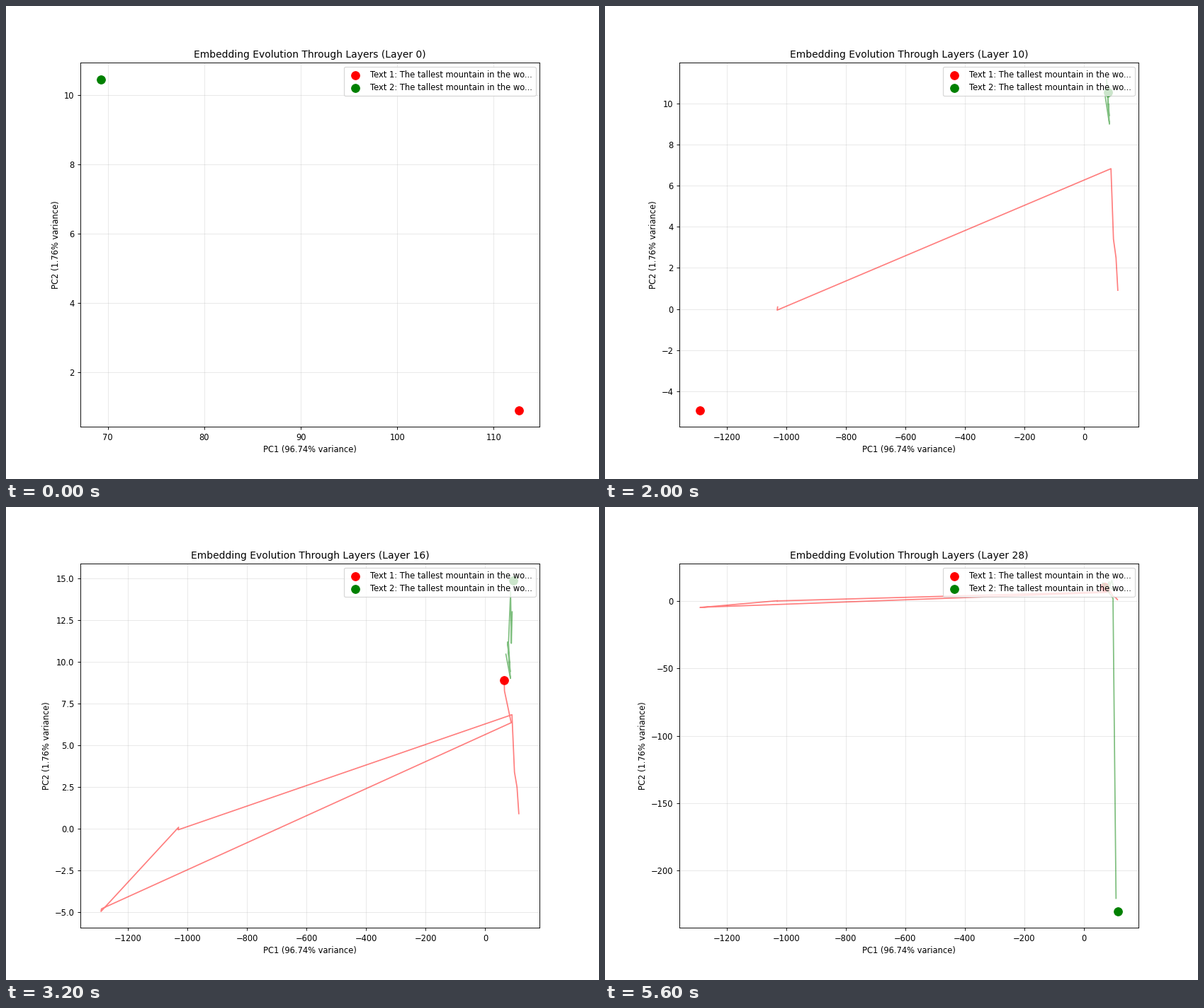
A matplotlib script that plays this animation: 837 px wide and 669 px high, repeating every 5800 ms.

```python
import numpy as np
import matplotlib.pyplot as plt
from matplotlib.animation import FuncAnimation

LAYERS = 29
CHECKED = range(8, 21, 6)
WIDTH, HEIGHT, DPI = 837, 669, 83.2


def walk(*keys):
    """Straight legs between (layer, PC1, PC2) turning points."""
    layer, x, y = np.transpose(keys)
    steps = np.arange(LAYERS)
    return np.column_stack([np.interp(steps, layer, v) for v in (x, y)])


red = walk((0, 112.6, 0.91), (2, 106.6, 2.49), (4, 98, 3.4), (7, 89.6, 6.83),
           (12, 87, 6.35), (14, 64.5, 8.25), (17, 63, 9.2), (19, 87, 7.15),
           (20, 74.5, 8.8), (21, 74, 9.2), (23, 87, 7.2), (25, 87, 8.08),
           (28, 68.5, 10.2))
# two far jumps, each followed by a slight recoil
red[8:10] -= 1120, 6.79
red[10:12] -= 1378, 11.48
red[[9, 11]] += 2, 0.25

green = walk((0, 69.3, 10.45), (4, 84.5, 9), (6, 75, 11.18), (8, 83.5, 9.4),
             (11, 78, 11.1), (12, 85, 14.2), (14, 87.5, 11.1), (16, 93, 14.87),
             (17, 94, 15.23), (19, 102, 7.65), (20, 102.5, 7.68),
             (23, 62.5, 13.45), (24, 63, 13), (25, 98, 1.75), (26, 98, -2),
             (27, 108, -220.5), (28, 114, -230.2))

# the small surplus keeps rounding from losing a pixel
fig, ax = plt.subplots(figsize=((WIDTH + 0.01) / DPI, (HEIGHT + 0.01) / DPI),
                       dpi=DPI)


def draw(layer):
    ax.clear()
    checked = layer in CHECKED
    ax.set_facecolor("#f0f0f0" if checked else "white")
    for i, (path, color) in enumerate([(red, "red"), (green, "green")], 1):
        ax.scatter(*path[layer], s=100, c=color,
                   label=f"Text {i}: The tallest mountain in the wo...")
        if layer > 0:
            ax.plot(*path[:layer].T, color=color, alpha=0.5)
    if checked:
        ax.text(0.5, 0.02, f"Verification Layer {layer}", ha="center",
                fontsize=12, transform=ax.transAxes,
                bbox=dict(facecolor="yellow", alpha=0.5))
    ax.set_title(f"Embedding Evolution Through Layers (Layer {layer})")
    ax.set_xlabel("PC1 (96.74% variance)")
    ax.set_ylabel("PC2 (1.76% variance)")
    ax.grid(True, alpha=0.3)
    ax.legend(loc="upper right")
    return []


anim = FuncAnimation(fig, draw, frames=LAYERS, init_func=lambda: draw(0),
                     interval=200, repeat=True, repeat_delay=0)
plt.show()
```
